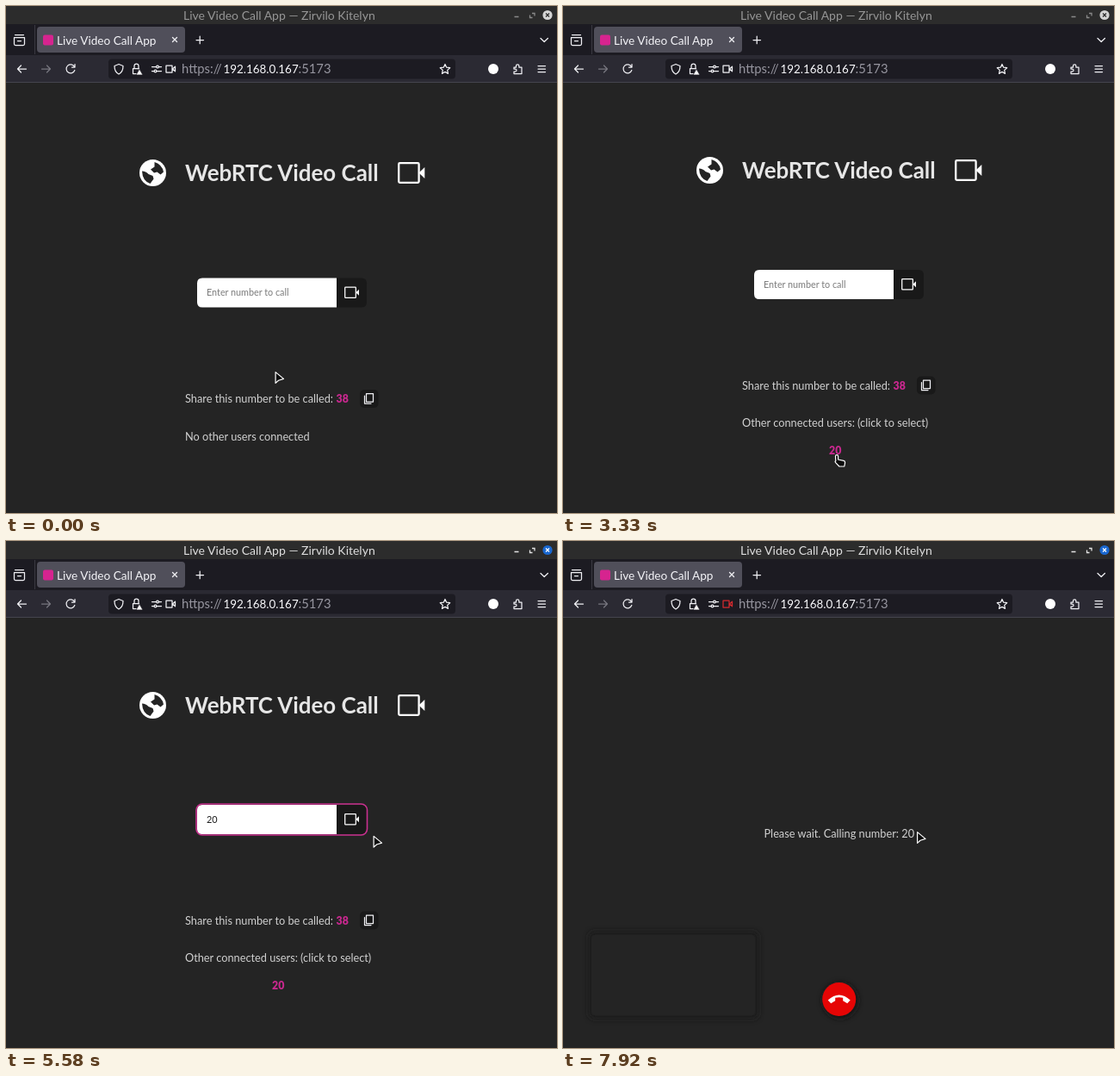
An HTML page for the animation above (8 s loop, 640x588 px).

```html
<!DOCTYPE html>
<html lang="en">
<head>
<meta charset="utf-8">
<title>Live Video Call App</title>
<style>
  html, body { margin: 0; width: 100%; height: 100%; overflow: hidden; background: #242424; }
  svg { display: block; width: 640px; height: 588px; }
  text { font-family: Ubuntu, Lato, "Open Sans", sans-serif; font-size: 12.75px; fill: #d2d2d2; white-space: pre; }
  .bar { font-size: 13.6px; fill: #f4f4f8; }
  .url { font-size: 14.8px; fill: #96959f; }
  .host { font-size: 13.4px; fill: #fbfbfe; }
  .line { fill: none; stroke: #f0f0f4; stroke-width: 1.25; stroke-linecap: round; stroke-linejoin: round; }
  .dim { stroke: #77767f; }
  .pink { fill: #c9288f; font-weight: 900; font-size: 12.3px; }
  .field { font-size: 10.8px; }
  .heading { font-size: 25.9px; font-weight: 700; fill: #e6e6e6; }
</style>
</head>
<body>
<svg viewBox="0 0 640 588">
  <defs>
    <g id="camera">
      <rect x="-14.8" y="-11.4" width="23.4" height="22.8" rx="1.3" fill="none" stroke="#fff" stroke-width="2.3"/>
      <path d="M8.5 0L15.3 -6.5V6.5Z" fill="#fff"/>
    </g>
    <filter id="blur" x="-20%" y="-30%" width="140%" height="160%"><feGaussianBlur stdDeviation="3"/></filter>
  </defs>
  <rect width="640" height="588" fill="#242424"/>

  <!-- window title -->
  <rect width="640" height="21" fill="#2c2c2c"/>
  <text id="title" class="bar" x="206" y="15.5" style="font-size:14px">Live Video Call App — Zirvilo Kitelyn</text>
  <path id="buttons" fill="none" stroke-width="1.3" d="M590.5 12.5h5M611 8.5h3v3M608.5 10.5v3h3"/>
  <circle id="close" cx="629" cy="10.5" r="5.6"/>
  <path id="cross" d="M627 8.5l4 4m0-4l-4 4" stroke-width="1.3"/>

  <!-- tabs -->
  <rect y="21" width="640" height="36" fill="#1c1b22"/>
  <rect x="36" y="24" width="172" height="30" rx="4" fill="#504f5a"/>
  <path d="M33.5 22v34" stroke="#3a3942"/>
  <g class="line">
    <path d="M10.5 33.5h10M9.5 36.5h12v7.5q0 1.5-1.5 1.5h-9q-1.5 0-1.5-1.5zM13.5 40.5h4"/>
    <path d="M193.5 36.5l5 5m0-5l-5 5M221 39.5h8.5M225.2 35.2v8.5M621 37.5l4.2 4 4.2-4"/>
  </g>
  <rect x="43" y="33.5" width="12" height="12" rx="2" fill="#d6248f"/>
  <text class="bar" x="59" y="44.5">Live Video Call App</text>

  <!-- toolbar -->
  <rect y="57" width="640" height="31" fill="#2b2a33"/>
  <path d="M0 88.5h640" stroke="#45444e"/>
  <rect x="119" y="61.5" width="403" height="23" rx="4" fill="#1c1b22"/>
  <g class="line">
    <path d="M23.5 73H13.5m4-4l-4 4 4 4"/>
    <path class="dim" d="M41.5 73h10m-4-4l4 4-4 4"/>
    <path d="M79.5 70.5a5 5 0 1 0 .3 4M80 67.5v3.5h-3.5"/>
    <path d="M131 67.5l5 2q0 7-5 9.5q-5-2.5-5-9.5z"/>
    <path d="M149 72v-2.5a2.5 2.5 0 0 1 5 0V72M147.5 72.5h7v6h-7z"/>
    <path d="M169.5 70.5h5m3 0h3M169.5 75.5h2.5m3 0h5.500"/>
    <circle cx="176" cy="70.5" r="1.4"/><circle cx="173.500" cy="75.5" r="1.4"/>
    <path id="sharing" d="M186 69h7v8h-7zM193.5 73l3-2.8v5.6z"/>
    <path d="M510 67.5l1.7 3.7 4 .5-3 2.7.8 4-3.5-2-3.5 2 .8-4-3-2.7 4-.5z"/>
    <path d="M590 71h2.500v-1.5a1.7 1.7 0 0 1 3.4 0V71H599v7.5h-9V76h1.5a1.5 1.5 0 0 0 0-3H590z"/>
    <path d="M618 69.5h8.5M618 73h8.5M618 76.5h8.5"/>
  </g>
  <path d="M155 73l4 7h-8z" fill="#fff" stroke="#1c1b22" stroke-width=".8"/>
  <circle cx="566" cy="73" r="6" fill="#fff"/>
  <text class="url" x="204" y="78">https://</text>
  <text class="url host" x="252.5" y="78">192.168.0.167</text>
  <text class="url" x="339.5" y="78">:5173</text>

  <!-- lobby -->
  <g id="lobby">
    <g id="head">
      <g transform="translate(170.500 193.500)">
        <circle r="15.5" fill="#fff"/>
        <path fill="#242424" d="M-12.500-2Q-8-2-5 1.500L0 3.500 1 7-3 12.500Q-12 9.500-12.500-2zM2-12.500Q11-9.500 12.500-1L9 2 5-1 1.500 0-2.500-4 2-7z"/>
      </g>
      <text class="heading" x="208" y="202.5">WebRTC Video Call</text>
      <use href="#camera" x="471" y="193.500"/>
    </g>
    <g id="form">
      <path id="call" d="M384 315.5h29q6 0 6 6v22q0 6-6 6h-29z"/>
      <path d="M384 315.5H228q-6 0-6 6v22q0 6 6 6h156z" fill="#fff"/>
      <rect id="ring" x="221" y="314.5" width="198.5" height="36" rx="7" fill="none" stroke="#c9308f" stroke-width="1.6"/>
      <text id="value" class="field" x="233" y="336.3"></text>
      <path id="caret" d="M245.5 326.5v12" stroke="#111"/>
      <use href="#camera" transform="translate(401.700 332.300) scale(.540)"/>
    </g>
    <g id="share">
      <text x="208" y="460">Share this number to be called:</text>
      <text class="pink" x="383.5" y="460">38</text>
      <rect x="411" y="445" width="21.5" height="21" rx="5" fill="#191919"/>
      <path class="line" d="M418.500 449.500h8v9.500h-8zM416.500 452v9h7.500"/>
    </g>
    <g id="users">
      <text id="note" x="208" y="503.5"></text>
      <text id="peer" class="pink" x="309" y="535.5">20</text>
    </g>
    <g id="tip">
      <rect x="410" y="353" width="81" height="37" rx="4" fill="#1269cb"/>
      <text x="422.5" y="376.3" style="font-size:13.7px;fill:#fff">Make call</text>
    </g>
  </g>

  <!-- outgoing call -->
  <g id="calling">
    <text x="233.5" y="343.5">Please wait. Calling number: 20</text>
    <rect x="30" y="453" width="197" height="101" rx="6" fill="#1c1c1c" filter="url(#blur)"/>
    <rect x="33" y="457" width="190" height="93" rx="4" fill="#242424"/>
    <circle cx="322" cy="533" r="20.5" fill="#191919" filter="url(#blur)"/>
    <circle cx="320.7" cy="531.5" r="19.5" fill="#e60505"/>
    <path transform="translate(320.700 531.500)" fill="#fff" d="M-13 1Q0-11 13 1l-3.500 3.700-5-3v-3.400Q0-3-4.500-1.700v3.400l-5 3z"/>
  </g>

  <g id="pointer" stroke="#fff" stroke-linejoin="round" stroke-width="1.200" fill="#0c0c0c">
    <path id="arrow" d="M.6.600V13.400L4 10.200 10 8.400Z"/>
    <path id="hand" d="M1.500.600q1.600 0 1.600 1.600V6l6.500 1.300q1.700.5 1.500 2.300L10.300 14H4.400L.2 9.600Q-1 8 .3 7.700L0 2.200Q0 .600 1.500.600z"/>
  </g>
</svg>
<script>
  const LOOP = 8000, TICK = 1000 / 12;
  const el = Object.fromEntries([...document.querySelectorAll('[id]')].map(n => [n.id, n]));

  // Pointer stops: time, x, y.
  const PATH = [
    [0, 312.5, 424], [2417, 312.5, 424], [2500, 313.5, 426], [2833, 320, 462],
    [3167, 317, 512], [3333, 316.5, 520], [4417, 316.5, 520], [4667, 385, 445],
    [4917, 452, 358], [5000, 459, 350.5], [5167, 460.5, 350], [5333, 455, 347],
    [5667, 417, 340], [5917, 411, 337], [8000, 411, 337]
  ];
  const between = (t, from, to) => t >= from && t < to;
  const ramp = (t, from, length) => Math.min(1, Math.max(0, (t - from) / length));
  const show = (node, on) => { node.style.opacity = +on; };
  const move = (node, x, y) => node.setAttribute('transform', `translate(${x} ${y})`);

  function pointerAt(t) {
    const i = PATH.findIndex(p => p[0] > t);
    const [t0, x0, y0] = PATH[i - 1], [t1, x1, y1] = PATH[i];
    const k = (t - t0) / (t1 - t0);
    return [x0 + (x1 - x0) * k, y0 + (y1 - y0) * k];
  }

  function render(time) {
    const t = Math.floor((time % LOOP + 5) / TICK) * TICK % LOOP;
    const joined = t > 1490, focused = t > 4410, dialling = t > 7825;
    const hover = between(t, 5660, 7825);

    // A new user makes the list taller, so the rows above move up.
    const shift = joined ? 1 - (1 - ramp(t, 1417, 583)) ** 3 : 0;
    move(el.head, 0, -3 * shift);
    move(el.form, 0, -9.5 * shift);
    move(el.share, 0, -15.5 * shift);
    move(el.users, 0, -16 * shift);
    el.note.textContent = joined ? 'Other connected users: (click to select)' : 'No other users connected';
    show(el.peer, shift);

    el.title.style.fill = focused ? '#dedede' : '#969696';
    el.buttons.setAttribute('stroke', focused ? '#e4e4e4' : '#8a8a8a');
    el.close.setAttribute('fill', focused ? '#1a68d0' : '#d4d4d4');
    el.cross.setAttribute('stroke', focused ? '#fff' : '#2c2c2c');
    el.sharing.style.stroke = dialling ? '#d42a2f' : '';

    el.value.textContent = focused ? '20' : 'Enter number to call';
    el.value.style.fill = focused ? '#1a1a1a' : '#7b7b7b';
    show(el.ring, focused);
    show(el.caret, between(t, 4490, 5580) || between(t, 6825, 7575));
    el.call.setAttribute('fill', hover ? '#2d0219' : '#191919');
    show(el.tip, t < 7000 ? t > 6160 : 1 - ramp(t, 7500, 167));

    show(el.lobby, !dialling);
    show(el.calling, dialling);

    const hand = between(t, 3160, 4490) || hover;
    show(el.hand, hand);
    show(el.arrow, !hand);
    move(el.pointer, ...pointerAt(t));
  }

  function frame() {
    render(performance.now());
    requestAnimationFrame(frame);
  }
  frame();
</script>
</body>
</html>
```
